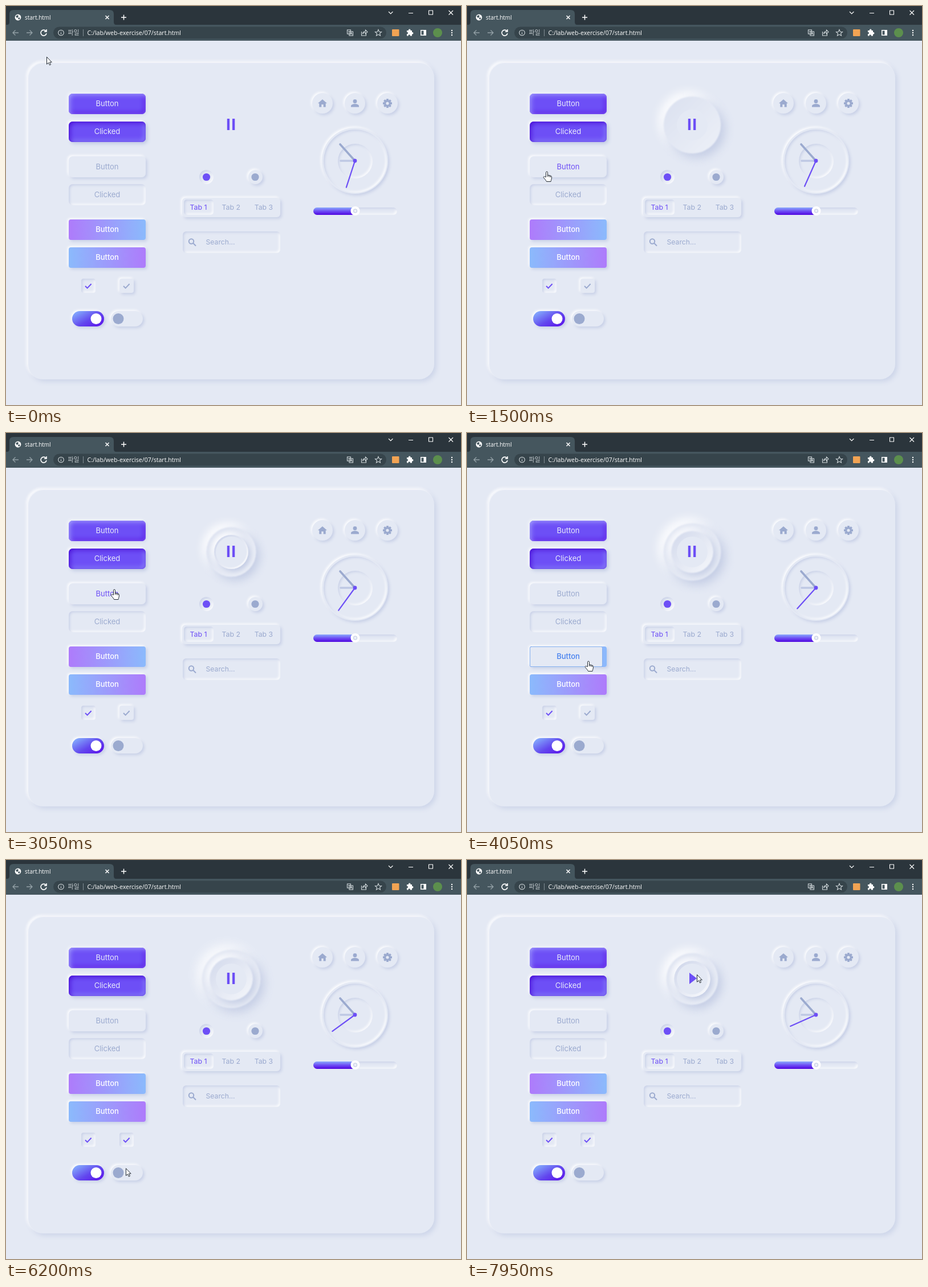
Animation, 798 px wide and 701 px high, one loop 8000 ms. Source, as an HTML page:

```html
<!DOCTYPE html>
<html lang="en">
<head>
<meta charset="utf-8">
<title>Soft controls</title>
<style>
:root { --bg: #e4e9f4; --shade: #c8d0e7; --gray: #9baacf; --main: #6d4ff6; --dark: #5206e0; --light: #8abdff; }
html, body { margin: 0; width: 100%; height: 100%; overflow: hidden; background: var(--bg); }
#stage { position: absolute; left: 0; top: 0; width: 798px; height: 701px; overflow: hidden; background: var(--bg); }
#stage div { position: absolute; box-sizing: border-box; }
svg { position: absolute; left: 0; top: 0; }
text { font-family: Inter, sans-serif; font-size: 13px; fill: var(--gray); }
.mid { text-anchor: middle; }
.ui { font-family: "Open Sans", "Noto Sans CJK KR", sans-serif; font-size: 10.6px; fill: #fff; }
.up { box-shadow: 2.7px 2.7px 5.4px var(--shade), -1.8px -1.8px 4.5px #fff; }
.in { box-shadow: inset 1.8px 1.8px 4.5px var(--shade), inset -1.8px -1.8px 4.5px #fff; }
.panel { box-shadow: 4px 4px 9px #cdd5e9, -2px -2px 5px #fff, inset 1px 1px 1px #f4f6fb; }
.solid { background: var(--main); box-shadow: inset 2px 2px 9px #a3a4ff, inset -2px -2px 9px var(--dark), 2px 2px 5px #d5dbed, -2px -2px 5px #f4f6fc; }
.held { background: var(--main); box-shadow: inset 2px 2px 9px #4200d4, inset -2px -2px 9px #9a9dff, 3px 3px 6px #bfc8e3, -2px -2px 5px #fff; }
.grad { background: linear-gradient(90deg, #ae7bfb, #8bbafc); }
.flip { background: linear-gradient(90deg, #8bbafc, #ae7bfb); }
.cover { background: var(--bg); border: 1px dotted #2478ea; }
.on { background: linear-gradient(330deg, #5b0eeb 0%, #6247ee 45%, var(--light) 100%); }
.fill { background: linear-gradient(180deg, #8ba9fc, #6a45f3 55%, #5006df); }
.wave { box-shadow: 4px 4px 9px #c3cce4, -4px -4px 10px #fff; background: var(--bg); filter: blur(.6px); }
.tone { inset: 0; border-radius: 50%; background: linear-gradient(135deg, #c8d0e7, #fff); }
</style>
</head>
<body>
<div id="stage"></div>
<script>
const LOOP = 8, stage = document.getElementById("stage");

function box(x, y, w, h, r, cls, parent = stage) {
  const el = document.createElement("div");
  el.className = cls;
  el.style.cssText = `left:${x}px;top:${y}px;width:${w}px;height:${h}px;border-radius:${r}px`;
  parent.append(el);
  return el;
}
const disc = (x, y, r, cls) => box(x - r, y - r, 2 * r, 2 * r, r, cls);

box(37.5, 98.5, 713.5, 557, 27, "panel");

// left column
box(110, 153.5, 135, 36.5, 7, "solid");
box(110, 202.5, 135, 36.5, 7, "held");
box(110, 264, 135, 36.5, 7, "up");
box(110, 313, 135, 36.5, 7, "in");
box(110, 374.5, 135, 36.5, 4, "grad up");
const coverA = box(110, 374.5, 0, 36.5, 3, "cover");
box(110, 423.5, 135, 36.5, 4, "flip up");
const coverB = box(110, 423.5, 0, 36.5, 3, "cover");
box(131.5, 479, 25, 25, 4, "in");
const tick2 = box(198.5, 479, 25, 25, 4, "up");
box(116, 536, 55.5, 27, 14, "on up");
box(184, 536, 55.5, 27, 14, "up");
const glow = box(184, 536, 55.5, 27, 14, "on");

// middle column
disc(351, 300.5, 12.5, "in");
disc(437, 300.5, 12.5, "up");
box(309, 337, 172, 34, 6, "up");
box(312, 340, 52, 27, 5, "in");
box(309.5, 395.5, 171, 38, 6, "in");

// right column
for (const x of [555, 612, 669]) disc(x, 171, 18.2, "up");
disc(612, 272, 58, "up");
disc(612, 272, 55.5, "in");
disc(612, 272, 30.5, "in");
box(538.5, 354, 147.5, 12.5, 7, "in");
box(538.5, 354, 75, 12.5, 7, "fill");

// play button with its two kinds of rings
const waves = [-1.9, 0.61, 2.61, 4.61, 6.61].map(start => {
  const el = disc(394.5, 208.5, 27, "wave");
  const tone = document.createElement("div");
  tone.className = "tone";
  el.append(tone);
  return { start, el, tone };
}).sort((a, b) => a.start - b.start);
const hub = disc(394.5, 208.5, 27, "");
hub.style.background = "radial-gradient(circle, #e4e9f4 90%, #e4e9f400)";

const label = (x, y, s, extra = "") => `<text class="mid" x="${x}" y="${y}" ${extra}>${s}</text>`;
const bold = 'style="fill:#fff;font-weight:500"';
const pale = 'style="fill:#e9ecfa"';
const check = (x, id, color) => `<path id="${id}" d="M${x - 5} 492l3.6 3.6 7-7.4" fill="none" stroke="${color}" stroke-width="2"/>`;
const gear = Array.from({ length: 8 }, (_, i) =>
  `<rect x="-2" y="-8" width="4" height="4" rx=".8" transform="rotate(${i * 45})"/>`).join("");

stage.insertAdjacentHTML("beforeend", `<svg width="798" height="701">
<rect width="798" height="34" fill="#2b353c"/>
<path d="M0 33H2q4 0 4-5V14q0-7 7-7H182q7 0 7 7V28q0 5 4 5H798V61H0z" fill="#45565e"/>
<rect x="83" y="36.5" width="584" height="21" rx="10.5" fill="#36444b"/>
<g fill="none" stroke="#fff" stroke-width="1.3">
  <path d="M174.500 17l6 6m0-6l-6 6M202 20h9m-4.500-4.500v9" stroke-width="1.500"/>
  <path d="M671 10l3.700 3.700 3.700-3.700M706 12.500h8M741.500 8h7v7h-7zM776.500 8l7.500 7.500m0-7.500l-7.500 7.500" stroke-width="1.100"/>
  <path d="M22 47H12m4.500-4.500L12 47l4.500 4.500M36 47h10m-4.500-4.500L46 47l-4.500 4.500" stroke="#92a0a6"/>
  <path d="M70 44a5 5 0 1 0 1 4M71 41v4h-4" stroke-width="1.600"/>
  <g stroke="#d2d9dc" stroke-width="1.100">
    <circle cx="96.500" cy="47" r="4.800"/><path d="M96.500 46.300v3.400m0-6v1"/>
    <path d="M135.500 41v12" stroke="#7c898f"/>
    <rect x="598.500" y="42" width="6" height="7"/><rect x="602" y="45" width="6.500" height="7"/><path d="M600 45h3M604 50l1.500-3 1.500 3"/>
    <path d="M623.500 45v7h8v-3M625.500 49c.5-3.500 2.500-4.500 5-4.500v-2.500l3.500 3.500-3.500 3.500v-2.500c-2.500 0-4 .5-5 2.500z"/>
    <path d="M653 41.500l1.600 3.700 4 .3-3 2.700.9 4-3.500-2.100-3.500 2.100.9-4-3-2.700 4-.3z"/>
  </g>
</g>
<circle cx="21" cy="20" r="5.400" fill="#fff"/>
<path d="M17 18l3-2 2 1-1 3-2 1zM22 20l3 1-2 3-2-2z" fill="#45565e"/>
<rect x="677" y="41" width="12.500" height="12" rx="1" fill="#f2a353"/>
<path d="M703 43h3a1.800 1.800 0 1 1 3.400 0h2.600v3a1.800 1.800 0 1 1 0 3.400v3h-3.300a1.600 1.600 0 1 0-3 0H703v-3.400a1.600 1.600 0 1 0 0-3z" fill="#fff"/>
<path d="M727 42h10v10h-10zm1.500 1.500v7h4v-7z" fill="#fff" fill-rule="evenodd"/>
<circle cx="757" cy="47" r="8" fill="#5c8f4d"/>
<g fill="#fff"><circle cx="782" cy="43" r="1.200"/><circle cx="782" cy="47" r="1.200"/><circle cx="782" cy="51" r="1.200"/></g>
<text class="ui" x="33" y="23.500" style="font-size:10px">start.html</text>
<text class="ui" x="108.500" y="50.500" style="fill:#c5ccd0;font-size:11px">파일</text>
<text class="ui" x="142.500" y="50.500">C:/lab/web-exercise/07/start.html</text>

${label(177.5, 176, "Button", pale)}${label(177.5, 225, "Clicked", pale)}
${label(177.5, 286.5, "Button", 'id="hoverText"')}${label(177.5, 335.500, "Clicked")}
${label(177.5, 397, "Button", bold + ' id="textA"')}${label(177.5, 446, "Button", bold + ' id="textB"')}
${check(144, "t1", "#6d4ff6")}${check(211, "t2", "#9baacf")}
<circle cx="158" cy="549.500" r="9.500" fill="#fff"/><circle id="knob" cy="549.500" r="9.500"/>
<circle cx="351.500" cy="300.500" r="6.600" fill="#6d4ff6"/><circle cx="437" cy="300.500" r="6.600" fill="#9baacf"/>
<g style="--s:12.300px">${["Tab 1", "Tab 2", "Tab 3"].map((s, i) =>
  label(337.5 + 57.2 * i, 357.5, s, `style="font-size:12.300px;fill:${i ? "#9baacf" : "#6d4ff6"}"`)).join("")}</g>
<text x="350.500" y="419" style="font-size:12.200px">Search...</text>
<g fill="none" stroke="#9baacf" stroke-width="2"><circle cx="325" cy="413.500" r="4.200"/><path d="M328 416.500l5 5"/></g>
<path id="pause" d="M387.800 198h4.300v20h-4.300zM397 198h4.300v20H397z" fill="#6d4ff6"/>
<path id="play" d="M390 198l13 10-13 10z" fill="#6d4ff6"/>
<g fill="#9baacf">
  <path d="M555 164l8 7h-2.300v6.500h-4V173h-3.400v4.500h-4V171H547z"/>
  <circle cx="612" cy="167.500" r="3.400"/><path d="M605 177.500v-1.500c0-3 4-4 7-4s7 1 7 4v1.500z"/>
  <g transform="translate(669 171)"><path d="M-6 0a6 6 0 1 0 12 0a6 6 0 1 0-12 0zM-2.600 0a2.600 2.600 0 1 1 5.200 0a2.600 2.600 0 1 1-5.200 0z" fill-rule="evenodd"/>${gear}</g>
</g>
<g stroke-linecap="round">
  <path d="M612 272H587" stroke="#bec8e4" stroke-width="3.600"/>
  <path d="M612 272L586 243" stroke="#9baacf" stroke-width="3.600"/>
  <path id="sec" d="M612 272V223" stroke="#6d4ff6" stroke-width="2.200"/>
</g>
<circle cx="612" cy="272" r="3.400" fill="#6d4ff6"/>
<circle cx="612.500" cy="360" r="8" fill="#fff"/><circle cx="612.500" cy="360" r="3" fill="#eef1f8" stroke="#cfd6e8" stroke-width="1.500"/>
<g id="cursor" fill="#fff" stroke="#222a33" stroke-linejoin="round">
  <path id="arrow" d="M.5.5V13.300l3-2.700 2 4.300 2-1-2-4.100h3.800z"/>
  <path id="hand" d="M-1.500 9.500V1.500a1.500 1.500 0 0 1 3 0V6l5.200 1.200q1.800.6 1.800 2.600c0 3.200-1 4.700-1.500 7.700H-.5C-1.500 15-4 12.700-5.600 10.500c-.8-1.500.8-2.500 2-1.600zM1.500 6v3M4 7v2.500M6.300 7.500V10"/>
</g></svg>`);

const $ = id => document.getElementById(id);
const clamp = v => Math.min(1, Math.max(0, v));
const ease = p => 1 - (1 - clamp(p)) ** 2.5;
const pulse = (t, from, to, d) => ease((t - from) / d) - ease((t - to) / d);
const show = (el, yes) => el.style.visibility = yes ? "visible" : "hidden";

// pointer stops: time, x, y
const path = [
  [0, 71, 89], [0.2, 71, 89], [0.8, 145, 170], [1.15, 160, 230], [1.5, 140, 291], [2.1, 146, 288],
  [3.05, 190, 275], [3.4, 194, 285], [4.05, 213, 401], [4.7, 209, 494], [5.05, 208, 498],
  [5.6, 208, 494], [6.3, 210, 544], [7.45, 211, 544], [7.85, 403, 201], [8, 403, 201]
];

function pointer(t) {
  const i = Math.max(1, path.findIndex(k => k[0] > t));
  const [a, b] = [path[i - 1], path[i]];
  let p = (t - a[0]) / (b[0] - a[0]);
  p = p * p * (3 - 2 * p);
  return [a[1] + (b[1] - a[1]) * p, a[2] + (b[2] - a[2]) * p];
}

const rows = [153, 202, 264, 313, 374, 423];

function drawWaves(t) {
  const now = Math.min(t, 7.3);
  for (const { start, el, tone } of waves) {
    const age = now - start;
    const size = Math.min(52, 27 + 6.75 * age) / 27;
    let alpha = age < 0 ? 0 : 1 - clamp((age - 3.45) / 1.15);
    if (start < 0) alpha *= clamp((t - 0.1) / 0.6);
    else if (start < 1) alpha *= clamp((t - 1.55) / 0.4);
    el.style.transform = `scale(${size})`;
    el.style.opacity = alpha;
    tone.style.opacity = 0.95 - 0.2 * clamp(age / 1.2) - 0.4 * clamp((age - 1) / 2);
    el.style.zIndex = 0;
  }
}

function draw(t) {
  const [x, y] = pointer(t);
  const row = x >= 110 && x <= 245 ? rows.findIndex(top => y >= top && y <= top + 37) : -1;
  $("cursor").setAttribute("transform", `translate(${x} ${y})`);
  show($("hand"), row >= 0);
  show($("arrow"), row < 0);
  $("hoverText").style.fill = row === 2 ? "#6d4ff6" : "#9baacf";

  const a = pulse(t, 3.7, 4.14, 0.5), b = pulse(t, 4.2, 4.42, 0.5);
  [[coverA, "textA", a], [coverB, "textB", b]].forEach(([el, id, v]) => {
    el.style.width = 135 * v + "px";
    show(el, v > 0.01);
    $(id).style.fill = v > 0.5 ? "#4680ee" : "#fff";
  });

  const checked = t >= 5.4;
  tick2.className = checked ? "in" : "up";
  $("t2").style.stroke = checked ? "#6d4ff6" : "#9baacf";

  const on = pulse(t, 6.88, 7.4, 0.4);
  glow.style.opacity = on;
  $("knob").setAttribute("cx", 197 + 28.5 * on);
  const mix = (from, to) => Math.round(from + (to - from) * on);
  $("knob").style.fill = `rgb(${mix(155, 240)},${mix(170, 243)},${mix(207, 250)})`;

  drawWaves(t);
  show($("pause"), t < 7.85);
  show($("play"), t >= 7.85);
  $("sec").setAttribute("transform", `rotate(${(33 + Math.floor(t + 0.25)) * 6} 612 272)`);
}

function frame() {
  draw(performance.now() / 1000 % LOOP);
  requestAnimationFrame(frame);
}
frame();
</script>
</body>
</html>
```
